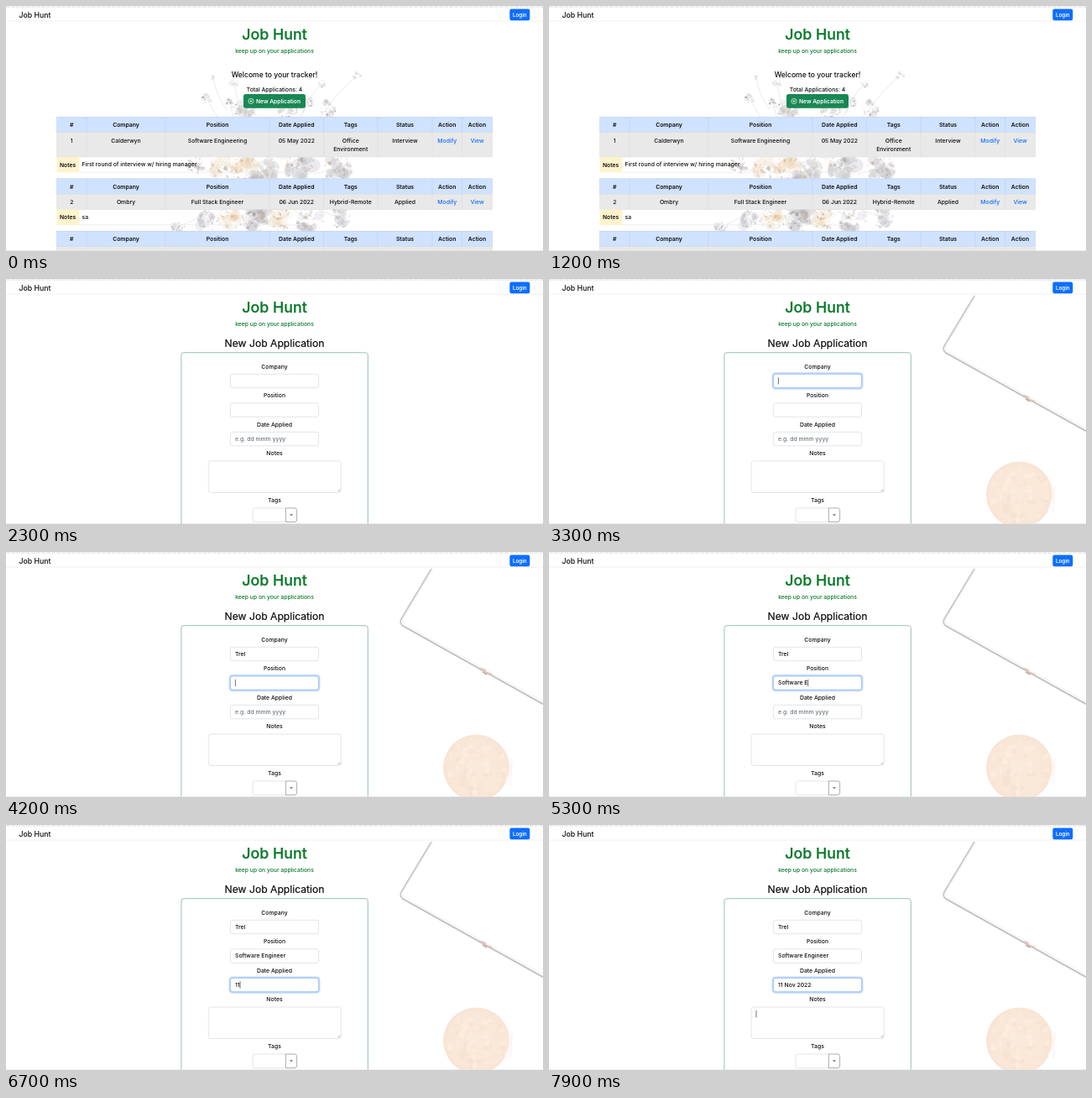
Animation of 640 by 292 pixels, one loop 8 s. Source, as an HTML page:

```html
<!DOCTYPE html>
<html lang="en">
<head>
<meta charset="utf-8">
<title>Job Hunt</title>
<style>
  html, body { margin: 0; width: 100%; height: 100%; overflow: hidden; background: #fff; }
  svg { display: block; width: 640px; height: 292px; }
  text { font: 500 6.85px Inter, Rubik, sans-serif; fill: #0c0c0c; white-space: pre; }
  .mid { text-anchor: middle; }
  .head { font-weight: 600; }
  .title { font-weight: 400; }
  .green { fill: #08782a; }
  .link { fill: #0d6efd; }
  .white { fill: #fff; }
  .hint { fill: #6c757d; }
  .field { fill: #fff; stroke: #ced4da; stroke-width: .6; }
  .caret { stroke: #111; stroke-width: .6; }
</style>
</head>
<body>
<svg id="stage" viewBox="0 0 640 292" xmlns="http://www.w3.org/2000/svg">
  <rect width="640" height="292" fill="#fff"/>
  <g id="list"></g>
  <g id="form"></g>
  <g id="top"></g>
</svg>
<script>
const LOOP = 8000, STEP = 100;
const $ = id => document.getElementById(id);
const clamp = v => Math.max(0, Math.min(1, v));

let seed = 4711;
const rnd = (a = 0, b = 1) => a + (b - a) * ((seed = seed * 16807 % 2147483647) / 2147483647);

const text = (x, y, s, cls = 'mid', size = 6.85, extra = '') =>
  `<text x="${x}" y="${y}" class="${cls}" style="font-size:${size}px" ${extra}>${s}</text>`;
const box = (x, y, w, h, attrs) => `<rect x="${x}" y="${y}" width="${w}" height="${h}" ${attrs}/>`;
const path = (d, attrs) => `<path d="${d}" fill="none" ${attrs}/>`;

// A randomly turned ellipse somewhere within a disc
function petal(cx, cy, spread, size, fill, opacity) {
  const a = rnd(0, 6.28), d = spread * Math.sqrt(rnd());
  const x = (cx + d * Math.cos(a)).toFixed(1), y = (cy + d * Math.sin(a)).toFixed(1);
  return `<ellipse cx="${x}" cy="${y}" rx="${size.toFixed(1)}" ry="${(size * rnd(.35, .85)).toFixed(1)}" ` +
    `fill="${fill}" opacity="${opacity.toFixed(2)}" transform="rotate(${rnd(0, 180).toFixed(0)} ${x} ${y})"/>`;
}

// Header shared by both pages
$('top').innerHTML =
  path('M0 1H640', 'stroke="#d4d4d4" stroke-width=".8" stroke-dasharray="5 1"') +
  path('M0 18H640', 'stroke="#ececec" stroke-width=".8"') +
  path('M0 291.6H640', 'stroke="#e4e4e4" stroke-width=".7"') +
  text(15.5, 13.6, 'Job Hunt', '', 8.75) +
  box(600.3, 3.6, 24, 13.7, 'rx="2.2" fill="#0d6efd"') +
  text(612.3, 12.7, 'Login', 'mid head white', 6.2) +
  text(320, 40, 'Job Hunt', 'mid green', 17.8, 'stroke="#08782a" stroke-width=".25"') +
  text(320, 55.6, 'keep up on your applications', 'mid green', 6.8);

// Pale dried-flower backdrop: clusters of x, y, spread, tone
function flowers() {
  const tones = ['#aaa8af', '#cf9f66', '#66605f', '#e8cda9'];
  const clusters = [
    [418, 83, 5, 0], [247, 85, 3, 0], [272, 93, 6, 0], [239, 110, 7, 0],
    [268, 116, 7, 2], [362, 114, 6, 2], [376, 92, 5, 0], [335, 127, 13, 0],
    [285, 126, 13, 3], [383, 122, 10, 0], [262, 150, 18, 0], [330, 155, 22, 3],
    [225, 190, 11, 0], [256, 192, 15, 1], [285, 193, 17, 1], [314, 196, 16, 3],
    [350, 190, 19, 0], [396, 194, 17, 0], [205, 263, 8, 2], [240, 256, 13, 0],
    [268, 253, 15, 1], [297, 254, 16, 2], [328, 253, 14, 1], [362, 256, 16, 0],
    [398, 252, 13, 0], [300, 225, 28, 3]
  ];
  let out = '';
  for (const [x, y, r, tone] of clusters) {
    const dx = (300 - x) * .3, dy = (215 - y) * .3;
    out += path(`M${x} ${y}q${dx / 2 + rnd(-6, 6)} ${dy / 2} ${dx} ${dy}`,
      'stroke="#8f8884" stroke-width=".5" opacity=".35"');
    for (let i = 0; i < r * .6; i++) out += petal(x, y, r * .8, r * rnd(.25, .6), tones[tone === 1 ? 3 : 0], rnd(.12, .28));
    for (let i = 0; i < r * 2; i++) {
      const fill = rnd() < .6 ? tones[tone] : tones[Math.floor(rnd(0, 4))];
      out += petal(x, y, r, rnd(.5, 1 + r * .1), fill, rnd(.15, .45));
    }
  }
  return out;
}

// Application tables
const cols = [60.5, 96, 190, 314, 378.5, 443, 508, 543.5, 579.5];
const titles = ['#', 'Company', 'Position', 'Date Applied', 'Tags', 'Status', 'Action', 'Action'];

function cells(y, h, fill, line, values, cls) {
  let out = box(cols[0], y, cols[8] - cols[0], h, `fill="${fill}" stroke="${line}" stroke-width=".5"`);
  values.forEach((value, i) => {
    const x = (cols[i] + cols[i + 1]) / 2;
    if (i) out += path(`M${cols[i]} ${y}v${h}`, `stroke="${line}" stroke-width=".5"`);
    value.split('|').forEach((s, n) => {
      out += text(x, y + 12.1 + n * 10.7, s, 'mid ' + (cls || (i > 5 ? 'link' : '')));
    });
  });
  return out;
}

function table(y, row, h, note) {
  let out = cells(y, 18.4, '#cfe2ff', '#bacbe6', titles, 'head') +
    cells(y + 18.4, h, '#e9e9e9', '#d9d9d9', row);
  const ny = y + 18.4 + h;
  if (note) out += box(60.5, ny, 26.8, 18.4, 'fill="#fff3cd"') +
    path(`M87.3 ${ny + 18.2}H347`, 'stroke="#e3e3e6" stroke-width=".6"') +
    text(64, ny + 11.6, 'Notes', 'head', 6.7) + text(90.5, ny + 11.3, note, '');
  return out;
}

$('list').innerHTML = flowers() +
  text(320, 84.6, 'Welcome to your tracker!', 'mid', 8.55) +
  text(320, 102.3, 'Total Applications: 4', 'mid', 6.8) +
  box(283, 105, 74, 16.8, 'rx="2.7" id="add"') +
  '<circle cx="292" cy="113.4" r="3.1" fill="none" stroke="#fff" stroke-width=".7"/>' +
  path('M290.4 113.4h3.2M292 111.8v3.2', 'stroke="#fff" stroke-width=".7"') +
  text(298, 115.9, 'New Application', 'head white', 6.7) +
  table(132.2, ['1', 'Calderwyn', 'Software Engineering', '05 May 2022', 'Office|Environment', 'Interview', 'Modify', 'View'],
    29.3, 'First round of interview w/ hiring manager') +
  table(205.8, ['2', 'Ombry', 'Full Stack Engineer', '06 Jun 2022', 'Hybrid-Remote', 'Applied', 'Modify', 'View'],
    18.4, 'sa') +
  table(268.3, Array(8).fill(''), 18.4);

// Desk backdrop: notebook corner and coffee cup
function desk() {
  let out = path('M507 20L471.5 79Q468 85 474 88.5L640 181', 'stroke="#c9c6c5" stroke-width="1.7"') +
    path('M509 20L473.5 79Q471 84 476 87L640 178', 'stroke="#eeecec" stroke-width=".8"') +
    path('M472 88L640 182', 'stroke="#b5b1b0" stroke-width=".6"') +
    path('M566 139.5l4 1.5 2 3 6 2', 'stroke="#d6c6c0" stroke-width="2.8" stroke-linecap="round"') +
    path('M568 143l5 3', 'stroke="#b79d95" stroke-width="1.2"') +
    '<circle cx="560.5" cy="257" r="39.5" fill="url(#cup)"/>';
  for (let i = 0; i < 70; i++) {
    out += petal(560.5, 257, 34, rnd(1, 5), rnd() < .65 ? '#fff5ea' : '#f3d8c0', .3);
  }
  return out + path('M597 240q8 18-2 35M603 246l-2 32', 'stroke="#fcf6f2" stroke-width="2"');
}

// Form: fields keep their focus time and the times of their keystrokes
const keys = (from, count) => Array.from({ length: count }, (_, i) => from + i * STEP);
const fields = [
  { label: 'Company', y: 113.3, value: 'Trel', focus: 3000, blur: 4000, keys: keys(3500, 4) },
  { label: 'Position', y: 147.9, value: 'Software Engineer', focus: 4000, blur: 6200, keys: keys(4400, 17) },
  { label: 'Date Applied', y: 182.4, value: '11 Nov 2022', focus: 6200, blur: 7900,
    keys: [6600, 6700, 6800, ...keys(7000, 8)], hint: 'e.g. dd mmm yyyy' }
];

$('form').innerHTML =
  `<defs><radialGradient id="cup"><stop offset="0" stop-color="#faeadb"/>
   <stop offset=".9" stop-color="#f9e6d6"/><stop offset="1" stop-color="#f8e4d4"/></radialGradient></defs>` +
  `<g id="desk">${desk()}</g>` +
  text(320, 81, 'New Job Application', 'mid title', 12.15, 'stroke="#0c0c0c" stroke-width=".2"') +
  box(208.9, 87.7, 222.4, 230, 'rx="3" fill="#fff" stroke="#96c2ae" stroke-width="1"') +
  fields.map((f, i) =>
    text(320, f.y - 6.8, f.label) +
    box(266.5, f.y - 1, 107, 18.4, `rx="3.4" fill="none" stroke="#0d6efd" stroke-opacity=".25" stroke-width="1.9" id="ring${i}"`) +
    box(267.4, f.y, 105.2, 16.4, 'rx="2.6" class="field"') +
    box(267.4, f.y, 105.2, 16.4, `rx="2.6" fill="none" stroke="#86b7fe" stroke-width=".7" id="edge${i}"`) +
    text(273, f.y + 10.5, '', '', 6.85, `id="value${i}"`)).join('') +
  text(320, 210.4, 'Notes') +
  box(241.3, 217, 158, 37.5, 'rx="2.6" class="field"') +
  path('M395.4 253.2l2.8-2.8M397 253.3l1.3-1.3', 'stroke="#777" stroke-width=".5"') +
  text(320, 266.3, 'Tags') +
  path('M333.4 273H296.6Q294 273 294 275.6V287Q294 289.6 296.6 289.6H333.4', 'class="field"') +
  path('M333.4 273H344Q346.6 273 346.6 275.6V287Q346.6 289.6 344 289.6H333.4Z', 'stroke="#858c93" stroke-width=".7"') +
  '<path d="M337.9 280.3h4.2l-2.1 2.2z" fill="#6c757d"/>' +
  '<path id="caret" class="caret"/>';

fields.forEach((f, i) => Object.assign(f, { ring: $('ring' + i), edge: $('edge' + i), text: $('value' + i) }));

const show = (el, on) => { el.style.display = on ? '' : 'none'; };

function draw(t) {
  const onForm = t >= 2300;
  show($('list'), !onForm);
  show($('form'), onForm);
  show($('desk'), t >= 2400);
  $('add').style.fill = t < 1700 ? '#198754' : '#157347';

  let caret = t >= 7900 ? 'M247 221v8.4' : '';
  for (const f of fields) {
    const typed = f.value.slice(0, f.keys.filter(k => k <= t).length);
    const glow = clamp((t - f.focus) / 150) - clamp((t - f.blur) / 150);
    f.ring.style.opacity = f.edge.style.opacity = glow;
    f.text.textContent = typed || f.hint || '';
    f.text.setAttribute('class', typed ? '' : 'hint');
    if (t >= f.focus && t < f.blur) {
      const width = typed ? f.text.getComputedTextLength() : 0;
      caret = `M${273.4 + width} ${f.y + 3.9}v8.4`;
    }
  }
  $('caret').setAttribute('d', caret || 'M0 0');
}

let start;
function tick(now) {
  start ??= now;
  draw(Math.floor((now - start) % LOOP / STEP) * STEP);
  requestAnimationFrame(tick);
}
draw(0);
requestAnimationFrame(tick);
</script>
</body>
</html>
```
